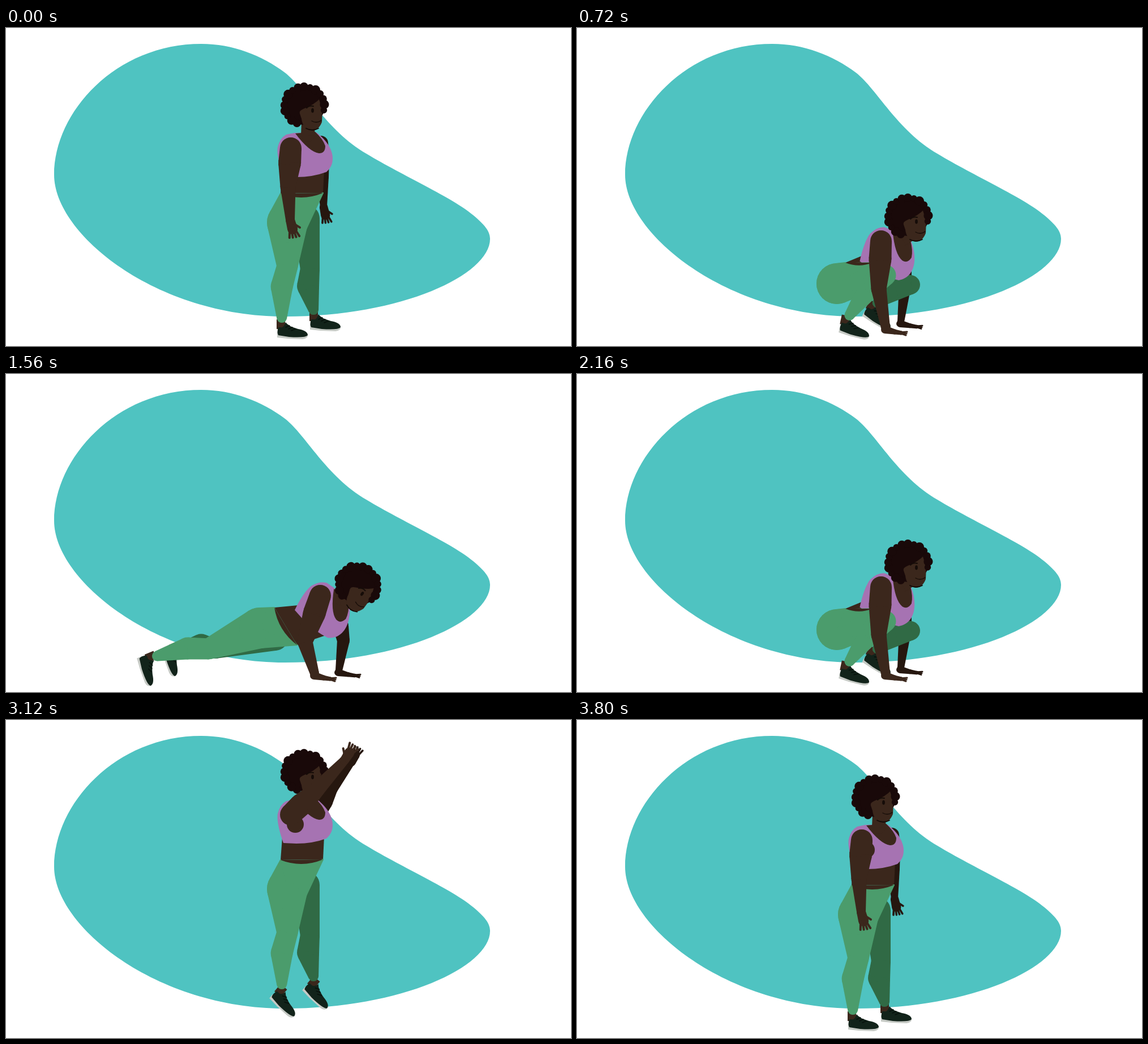
Animation of 998x561 px, one loop 3.84 s. Source, as an HTML page with a canvas:

```html
<!DOCTYPE html>
<html lang="en">
<head>
<meta charset="utf-8">
<title>Burpee</title>
<style>
html, body { margin: 0; width: 100%; height: 100%; overflow: hidden; background: #fff; }
canvas { display: block; }
</style>
</head>
<body>
<canvas id="stage" width="998" height="561"></canvas>
<script>
const ctx = document.getElementById('stage').getContext('2d');
const LOOP = 3840, STEP = 40, TAKEOFF = 2920, AIRTIME = 470;
const C = {
  blob: '#4fc3c1', skin: '#3b271c', farSkin: '#26170f', hair: '#190909', line: '#150c08',
  top: '#a673b2', leg: '#4b9c6c', farLeg: '#306a45', shoe: '#12231a', lace: '#07100b', sole: '#c6cac5'
};
const BLOB = new Path2D('M85 259C85 148 194 28 345 28C400 28 452 48 493 79C530 108 565 180 637 222' +
  'C700 260 790 300 825 330C845 347 855 358 855 372C855 435 700 509 492 509C266 509 85 364 85 259Z');
// Body parts are drawn around their joint.
const TOP = new Path2D('M-8-24L6-27L45-28C59-18 74 0 74 18C74 30 69 36 63 42Q39 51 10 51L-13 50C-21 28-25 8-23-2Q-19-18-8-24Z');
const NECKLINE = new Path2D('M8-26L43-29Q57-16 61-4Q61 9 50 9Q33 7 8-26Z');
const FACE = new Path2D('M-22 6C-24-4-7-1 12-19Q19 0 17 21Q11 36-1 36Q-17 33-19 15Z');
const SOLE = new Path2D('M-7 14L-7 24L12 26L38 27Q48 26 47 18L0 17Z');
const SHOE = new Path2D('M-5 6L-1 6Q4 8 8-3Q12 4 30 9Q47 12 47 20Q43 25 14 23L-5 20Q-8 15-5 6Z');

// Joints as [x, y] or [x, y, degrees]; the chest turns about the near shoulder.
const stand = {
  head: [541, 145, 0], chest: [503, 212, 0], waistBack: [485, 292], waistFront: [560, 291],
  hip: [497, 343], knee: [497, 420], shoe: [486, 522, 0],
  farHip: [530, 336], farKnee: [537, 425], farShoe: [544, 508, 0],
  elbow: [498, 280], wrist: [502, 338],
  farShoulder: [556, 203], farElbow: [559, 262], farWrist: [561, 315]
};
const squat = {
  head: [599, 341, 0], chest: [537, 376, 32], waistBack: [474, 414], waistFront: [522, 414],
  hip: [459, 451], knee: [545, 436], shoe: [474, 515, 12],
  farHip: [500, 450], farKnee: [589, 453], farShoe: [521, 490, 28],
  elbow: [533, 460], wrist: [545, 528],
  farShoulder: [575, 400], farElbow: [580, 450], farWrist: [572, 518]
};
const plank = {
  head: [629, 387, 34], chest: [555, 391, 46], waistBack: [474, 412], waistFront: [514, 478],
  hip: [448, 448], knee: [358, 485], shoe: [256, 499, 68],
  farHip: [475, 464], farKnee: [370, 485], farShoe: [299, 482, 68],
  elbow: [528, 472], wrist: [545, 528],
  farShoulder: [588, 430], farElbow: [596, 470], farWrist: [588, 523]
};
const crouch = {
  ...stand, head: [559, 181, 0], chest: [515, 242, 5], waistBack: [480, 317], waistFront: [555, 329],
  hip: [491, 352], knee: [520, 426], farHip: [530, 370], farKnee: [555, 430],
  elbow: [514, 315], wrist: [520, 375],
  farShoulder: [566, 245], farElbow: [570, 310], farWrist: [566, 360]
};
const reach = {
  ...stand, elbow: [550, 167], wrist: [597, 117],
  farShoulder: [563, 195], farElbow: [582, 158], farWrist: [617, 112]
};

// The press-up tilts the plank about the feet while the hands stay put.
const low = { ...plank };
for (const joint in plank) {
  if (/shoe|wrist/i.test(joint)) continue;
  const [x, y, ...turn] = plank[joint];
  low[joint] = [x, y + 28 * Math.max(0, x - 262) / 300, ...turn];
}

// Arms blend by angle and length, so that they swing in arcs.
const polar = (a, b) => [Math.atan2(b[1] - a[1], b[0] - a[0]), Math.hypot(b[0] - a[0], b[1] - a[1])];
for (const p of [stand, squat, plank, crouch, reach, low]) {
  p.arm = [...polar(p.chest, p.elbow), ...polar(p.elbow, p.wrist)];
  p.farArm = [...polar(p.farShoulder, p.farElbow), ...polar(p.farElbow, p.farWrist)];
}
const raise = ([a, l, b, m]) => [a - .28, l, b - .28, m];
const high = { ...reach, arm: raise(reach.arm), farArm: raise(reach.farArm) };

const linear = u => u;
const easeIn = u => u * u;
const inOut = u => u < .5 ? 2 * u * u : 1 - 2 * (1 - u) ** 2;
const floorWork = [
  [0, stand], [640, squat, inOut], [740, squat], [1100, plank, inOut], [1320, low, inOut],
  [1560, plank, inOut], [1760, plank], [2160, squat, inOut], [2800, crouch, easeIn]
];
const bodyTrack = [...floorWork, [TAKEOFF, stand, linear], [LOOP, stand]];
const armTrack = [...floorWork, [3120, reach, inOut], [3220, high, inOut], [3780, stand, inOut], [LOOP, stand]];

const clamp = v => Math.max(0, Math.min(1, v));
const mix = (a, b, u) => a.map((v, i) => v + (b[i] - v) * u);
function sample(track, t) {
  const i = track.findIndex((key, n) => n && t <= key[0]);
  const [t0, a] = track[i - 1], [t1, b, ease = linear] = track[i];
  const u = ease((t - t0) / (t1 - t0)), pose = {};
  for (const joint in a) pose[joint] = mix(a[joint], b[joint], u);
  return pose;
}

const radians = degrees => degrees * Math.PI / 180;
function attach([x, y, degrees], [dx, dy]) {
  const c = Math.cos(radians(degrees)), s = Math.sin(radians(degrees));
  return [x + dx * c - dy * s, y + dx * s + dy * c];
}
function fill(path, color) {
  ctx.fillStyle = color;
  ctx.fill(path);
}
function polygon(points, color) {
  const path = new Path2D();
  for (const p of points) path.lineTo(p[0], p[1]);
  fill(path, color);
}
function disc(x, y, rx, color, ry = rx) {
  const path = new Path2D();
  path.ellipse(x, y, rx, ry, 0, 0, 7);
  fill(path, color);
}
function stroke(d, width, color) {
  ctx.lineWidth = width;
  ctx.lineCap = 'round';
  ctx.strokeStyle = color;
  ctx.stroke(new Path2D(d));
}
function placed([x, y, degrees = 0], paint) {
  ctx.save();
  ctx.translate(x, y);
  ctx.rotate(radians(degrees));
  paint();
  ctx.restore();
}

// A chain of discs [x, y, radius] joined by their outer tangents.
function limb(discs, color) {
  discs.forEach(([x, y, r], i) => {
    disc(x, y, r, color);
    if (!i) return;
    const [px, py, pr] = discs[i - 1];
    const [angle, gap] = polar([px, py], [x, y]);
    if (gap <= Math.abs(pr - r)) return;
    const spread = Math.acos((pr - r) / gap);
    const rim = (cx, cy, cr, a) => [cx + cr * Math.cos(a), cy + cr * Math.sin(a)];
    polygon([rim(px, py, pr, angle - spread), rim(x, y, r, angle - spread),
      rim(x, y, r, angle + spread), rim(px, py, pr, angle + spread)], color);
  });
}

function drawShoe(shoe) {
  placed(shoe, () => {
    ctx.fillStyle = C.skin;
    ctx.fillRect(-8, -8, 15, 17);
    fill(SOLE, C.sole);
    fill(SHOE, C.shoe);
    for (let i = 0; i < 3; i++) stroke(`M${8 + i * 5} ${6 + i * 3}l7-3`, 1.5, C.lace);
  });
}

function drawLeg(hip, knee, shoe, hipRadius, kneeRadius, color) {
  const [angle, length] = polar(knee, shoe);
  const along = (distance, back) => [
    knee[0] + Math.cos(angle) * distance - Math.sin(angle) * back,
    knee[1] + Math.sin(angle) * distance + Math.cos(angle) * back
  ];
  limb([[...hip, hipRadius], [...knee, kneeRadius], [...along(length * .36, 6), 19.5],
    [...along(length - 11, 0), 9]], color);
}

function drawPelvis({ waistBack, waistFront, hip }) {
  limb([[...waistBack, 1], [...hip, 36], [...waistFront, 1]], C.leg);
  polygon([waistBack, waistFront, hip], C.leg);
  const [ax, ay] = waistBack, [bx, by] = waistFront;
  const dip = new Path2D();
  dip.moveTo(ax, ay);
  dip.quadraticCurveTo((ax + bx) / 2 - (by - ay) * .2, (ay + by) / 2 + (bx - ax) * .2, bx, by);
  fill(dip, C.skin);
}

function drawTorso({ chest, head, waistBack, waistFront }) {
  polygon([waistBack, waistFront, attach(chest, [59, 38]), attach(chest, [-15, 40])], C.skin);
  placed(chest, () => {
    fill(TOP, C.top);
    fill(NECKLINE, C.skin);
  });
  limb([[...attach(chest, [30, -23]), 12], [...attach(head, [-7, 21]), 12]], C.skin);
}

function drawHand(color, size) {
  ctx.scale(size, size);
  limb([[1, 0, 8], [17, -3, 9]], color);
  for (let i = 0; i < 4; i++) {
    const a = .1 - i * .2;
    stroke(`M17 ${2 - i * 3}l${15 * Math.cos(a)} ${15 * Math.sin(a)}`, 4, color);
  }
  stroke('M8-6L15-16', 4, color);
}
function drawFlatHand(color, size) {
  ctx.scale(1, size);
  limb([[-1, 4, 7], [16, 8, 4.5], [28, 10, 3.5]], color);
  for (let i = 0; i < 3; i++) stroke(`M22 9L${38 - i} ${8 + i * 3}`, 3, color);
}

function drawArm([sx, sy], [a, upper, b, fore], radii, color, size, flat) {
  const along = d => [sx + Math.cos(a) * d, sy + Math.sin(a) * d];
  const elbow = along(upper);
  const wrist = [elbow[0] + Math.cos(b) * fore, elbow[1] + Math.sin(b) * fore];
  const joints = [[sx, sy], along(upper * .38), elbow, wrist];
  limb(joints.map((p, i) => [...p, radii[i]]), color);
  ctx.globalAlpha = clamp(2 * (1 - flat));
  placed([...wrist, b * 180 / Math.PI], () => drawHand(color, size));
  ctx.globalAlpha = flat;
  placed(wrist, () => drawFlatHand(color, size));
  ctx.globalAlpha = 1;
}

function drawHead(head) {
  placed(head, () => {
    disc(-14, -9, 37, C.hair, 35);
    fill(FACE, C.skin);
    for (let i = 0; i < 16; i++) {
      const a = 1.95 + i * .305;
      disc(-14 + 35.5 * Math.cos(a), -8 + 33.5 * Math.sin(a), 7 + 1.3 * Math.sin(i * 2.4), C.hair);
    }
    disc(.5, .5, 2.4, C.line, 4);
    stroke('M-10-4Q-5-9 2-7', 2, C.line);
    stroke('M-1 19Q8 24 16 18', 1.4, C.line);
    stroke('M-11 32Q0 38 11 32', 1.8, C.line);
  });
}

function draw(t) {
  const body = sample(bodyTrack, t), { arm, farArm } = sample(armTrack, t);
  const air = clamp((t - TAKEOFF) / AIRTIME), lift = 4 * air * (1 - air);
  const flat = clamp((t - 420) / 160) * clamp((2860 - t) / 170);
  for (const shoe of [body.shoe, body.farShoe]) shoe[2] += 41 * lift;

  ctx.fillStyle = '#fff';
  ctx.fillRect(0, 0, 998, 561);
  fill(BLOB, C.blob);

  ctx.save();
  ctx.translate(0, -46 * lift);
  drawArm(body.farShoulder, farArm, [13, 14, 11, 6], C.farSkin, .9, flat);
  drawShoe(body.farShoe);
  drawLeg(body.farHip, body.farKnee, body.farShoe, 24, 17, C.farLeg);
  drawTorso(body);
  drawShoe(body.shoe);
  drawLeg(body.hip, body.knee, body.shoe, 36, 18.5, C.leg);
  drawPelvis(body);
  drawHead(body.head);
  if (t > TAKEOFF) disc(body.chest[0] + 8, body.chest[1] + 17, 15, C.skin);
  drawArm(body.chest, arm, [19, 20, 13.5, 8], C.skin, 1, flat);
  ctx.restore();
}

const start = performance.now();
function tick() {
  const t = (performance.now() - start) % LOOP;
  draw(Math.floor(t / STEP) * STEP);
  requestAnimationFrame(tick);
}
tick();
</script>
</body>
</html>
```
